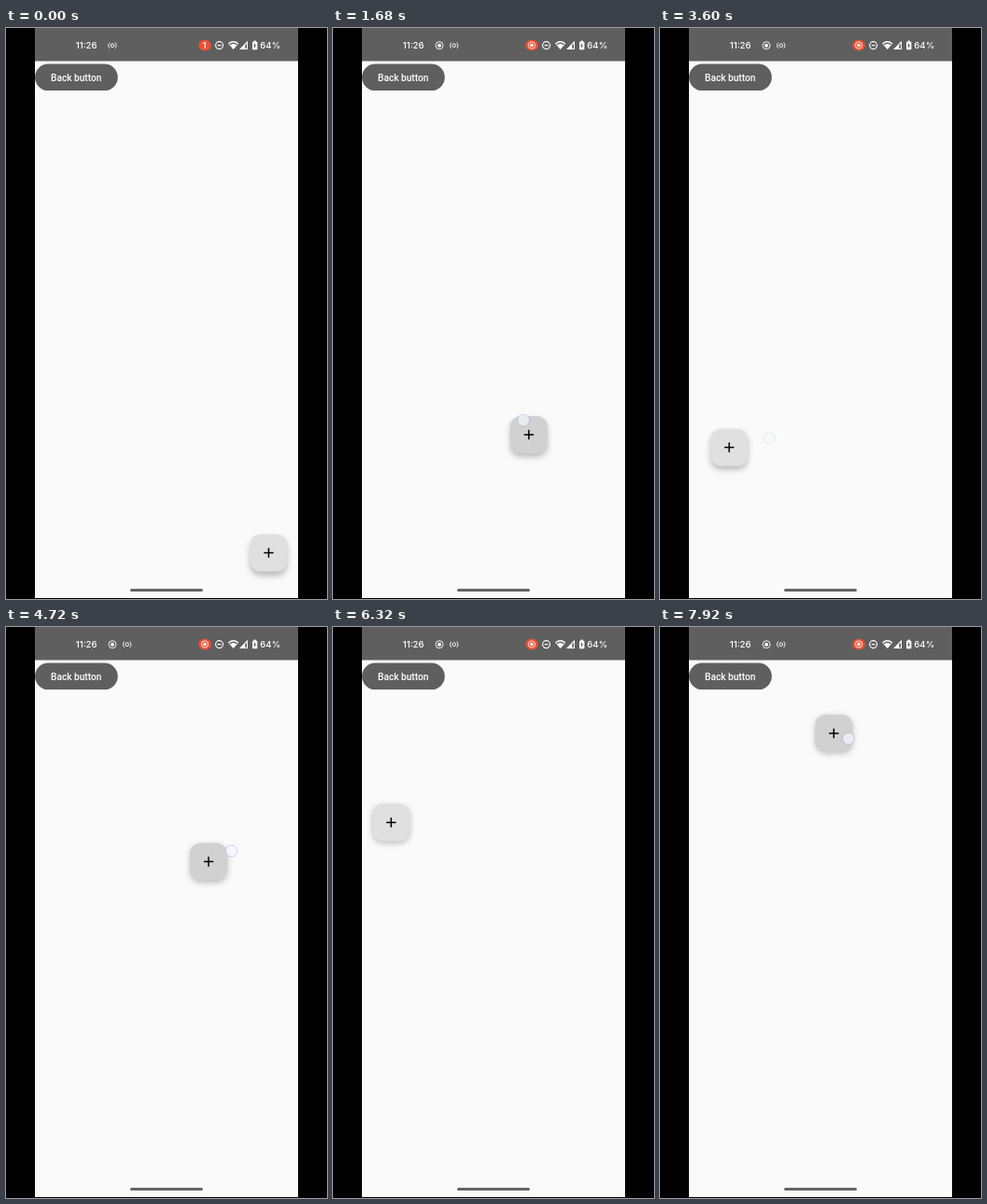
Animation, 344 px wide and 612 px high, one loop 8000 ms. Source, as an HTML page with a canvas:

```html
<!DOCTYPE html>
<html lang="en">
<head>
<meta charset="utf-8">
<title>Draggable button</title>
<style>
html, body { margin: 0; width: 100%; height: 100%; overflow: hidden; background: #000; }
canvas { display: block; width: 344px; height: 612px; }
</style>
</head>
<body>
<canvas id="stage"></canvas>
<script>
const W = 344, H = 612, LOOP = 8000;
const LEFT = 62.3, RIGHT = 281.5;
const SNAP = 300, LAG = 36;
const BAR = '#5f5f5f';
const canvas = document.getElementById('stage');
const ctx = canvas.getContext('2d');
const dpr = window.devicePixelRatio || 1;
canvas.width = W * dpr;
canvas.height = H * dpr;

// Each drag carries the button to `to`; it then snaps to the edge `home`.
// grip: finger relative to the button. bend: how far the path bows from a line.
const drags = [
  { down: 1120, move: 1280, lift: 1780, to: [200, 424], home: RIGHT, grip: [0, -8.5], bend: 1.2 },
  { down: 2480, move: 2532, lift: 3460, to: [128, 449.5], home: LEFT, grip: [-11, -10], bend: 0.5 },
  { down: 4160, move: 4240, lift: 4820, to: [237, 240.5], home: RIGHT, grip: [13, -5], bend: 1.5 },
  { down: 5520, move: 5580, lift: 6020, to: [118, 209.5], home: LEFT, grip: [0, -5], bend: 1 },
  { down: 6720, move: 7380, lift: 8100, to: [209, 96.5], home: RIGHT, grip: [8, 11.5], bend: 1 }
];
let rest = [RIGHT, 562.5];
for (const d of drags) {
  d.from = rest;
  rest = [d.home, d.to[1]];
}

const clamp = v => Math.max(0, Math.min(1, v));
const ramp = (t, a, b) => clamp((t - a) / (b - a));
const mix = (a, b, k) => a + (b - a) * k;
const smooth = k => k * k * (3 - 2 * k);

function dragged(d, t) {
  const p = smooth(ramp(t, d.move, d.lift));
  return [
    mix(d.from[0], d.to[0], Math.pow(p, d.bend)),
    mix(d.from[1], d.to[1], Math.pow(p, 1 / d.bend))
  ];
}

function stateAt(t) {
  const d = drags.filter(e => t >= e.down).pop() || drags[0];
  const [x, y] = dragged(d, t);
  const [fx, fy] = dragged(d, t + LAG);
  const snap = 1 - Math.pow(1 - ramp(t, d.lift, d.lift + SNAP), 2.7);
  const press = ramp(t, d.down + 90, d.down + 160) * (1 - ramp(t, d.lift, d.lift + 130));
  return {
    x: mix(x, d.home, snap),
    y,
    level: Math.round(mix(224, 209, press)),
    finger: [fx + d.grip[0], fy + d.grip[1]],
    touch: t < d.down ? 0 : 1 - ramp(t, d.lift + 60, d.lift + 200)
  };
}

function box(x, y, w, h, r, fill) {
  ctx.beginPath();
  ctx.roundRect(x, y, w, h, r);
  ctx.fillStyle = fill;
  ctx.fill();
}

function poly(points, fill) {
  ctx.beginPath();
  points.forEach(p => ctx.lineTo(p[0], p[1]));
  ctx.fillStyle = fill;
  ctx.fill();
}

function arc(x, y, r, width, color, a = 0, b = Math.PI * 2) {
  ctx.beginPath();
  ctx.arc(x, y, r, a, b);
  ctx.lineWidth = width;
  ctx.strokeStyle = color;
  ctx.stroke();
}

function dot(x, y, r, fill) {
  ctx.beginPath();
  ctx.arc(x, y, r, 0, Math.PI * 2);
  ctx.fillStyle = fill;
  ctx.fill();
}

function text(str, x, y, size, family, align = 'left') {
  ctx.font = `500 ${size}px ${family}, "Liberation Sans", sans-serif`;
  ctx.textAlign = align;
  ctx.fillStyle = '#fff';
  ctx.fillText(str, x, y);
}

function recordIcon(x, y, k) {
  dot(x, y, 2 * k, '#fff');
  arc(x, y, 4 * k, 0.9 * k, '#fff');
}

function castIcon(x, y) {
  arc(x, y, 1.8, 1, '#fff');
  arc(x, y, 4.2, 0.9, '#fff', -0.85, 0.85);
  arc(x, y, 4.2, 0.9, '#fff', Math.PI - 0.85, Math.PI + 0.85);
}

function wifiIcon(x, y) {
  ctx.beginPath();
  ctx.moveTo(x, y);
  ctx.lineTo(x - 5.7, y - 6.6);
  ctx.quadraticCurveTo(x, y - 11.2, x + 5.7, y - 6.6);
  ctx.fillStyle = '#fff';
  ctx.fill();
  arc(x, y, 6.6, 1.6, BAR, -2.2, -0.94);
}

function statusBar(t) {
  box(31, 0, 282, 35.4, 0, BAR);
  text('11:26', 74.7, 22.2, 9.6, 'Inter');

  const k = smooth(ramp(t, 40, 560));
  recordIcon(114, 18.7, k);
  castIcon(mix(114, 129.7, k), 18.7);

  box(206.4, 12.7, 13.4, 11.6, 5.8, '#ec5035');
  if (t < 200) text('1', 213, 22, 9, 'Roboto', 'center');
  else recordIcon(213, 18.5, 0.9);

  // do not disturb
  arc(228.6, 18.6, 4, 1.1, '#fff');
  box(226.6, 18, 4, 1.2, 0, '#fff');

  wifiIcon(243.7, 23);

  // mobile signal
  poly([[250, 23], [259, 23], [259, 13.8]], '#fff');
  poly([[256.3, 18.2], [258, 16.4], [258, 22], [256.3, 22]], BAR);

  // battery
  box(264, 14.7, 5.4, 8.5, 0.8, '#fff');
  box(265.5, 13.6, 2.4, 1.4, 0, '#fff');
  poly([[267, 15.8], [265.2, 19.4], [266.4, 19.4], [266.2, 22], [268.2, 18.4], [267, 18.4]], BAR);
  text('64%', 272.3, 22.2, 9.6, 'Inter');
}

function button(s) {
  ctx.save();
  ctx.shadowColor = 'rgba(0,0,0,0.25)';
  ctx.shadowBlur = 6.5 * dpr;
  ctx.shadowOffsetY = (0.8 + 4.2 * s.y / H) * dpr;
  box(s.x - 20, s.y - 20, 40, 40, 11.5, `rgb(${s.level},${s.level},${s.level})`);
  ctx.restore();
  box(s.x - 5.2, s.y - 0.75, 10.4, 1.5, 0, '#000');
  box(s.x - 0.75, s.y - 5.2, 1.5, 10.4, 0, '#000');
}

function touch([x, y], alpha) {
  ctx.globalAlpha = alpha;
  dot(x, y, 6.3, 'rgba(244,247,255,0.72)');
  arc(x, y, 6.3, 0.8, 'rgba(150,160,212,0.6)');
  ctx.globalAlpha = 1;
}

function draw(t) {
  ctx.setTransform(dpr, 0, 0, dpr, 0, 0);
  box(0, 0, W, H, 0, '#000');
  box(31, 0, 282, 611, 0, '#fafafa');
  statusBar(t);
  box(31, 38.5, 88.8, 28.6, 14.3, BAR);
  text('Back button', 75.2, 56.7, 10.15, 'Roboto', 'center');
  box(133, 601, 78, 3, 1.5, '#666');

  const s = stateAt(t);
  button(s);
  touch(s.finger, s.touch);
}

const start = performance.now();
function tick() {
  draw((performance.now() - start) % LOOP);
  requestAnimationFrame(tick);
}
tick();
</script>
</body>
</html>
```
